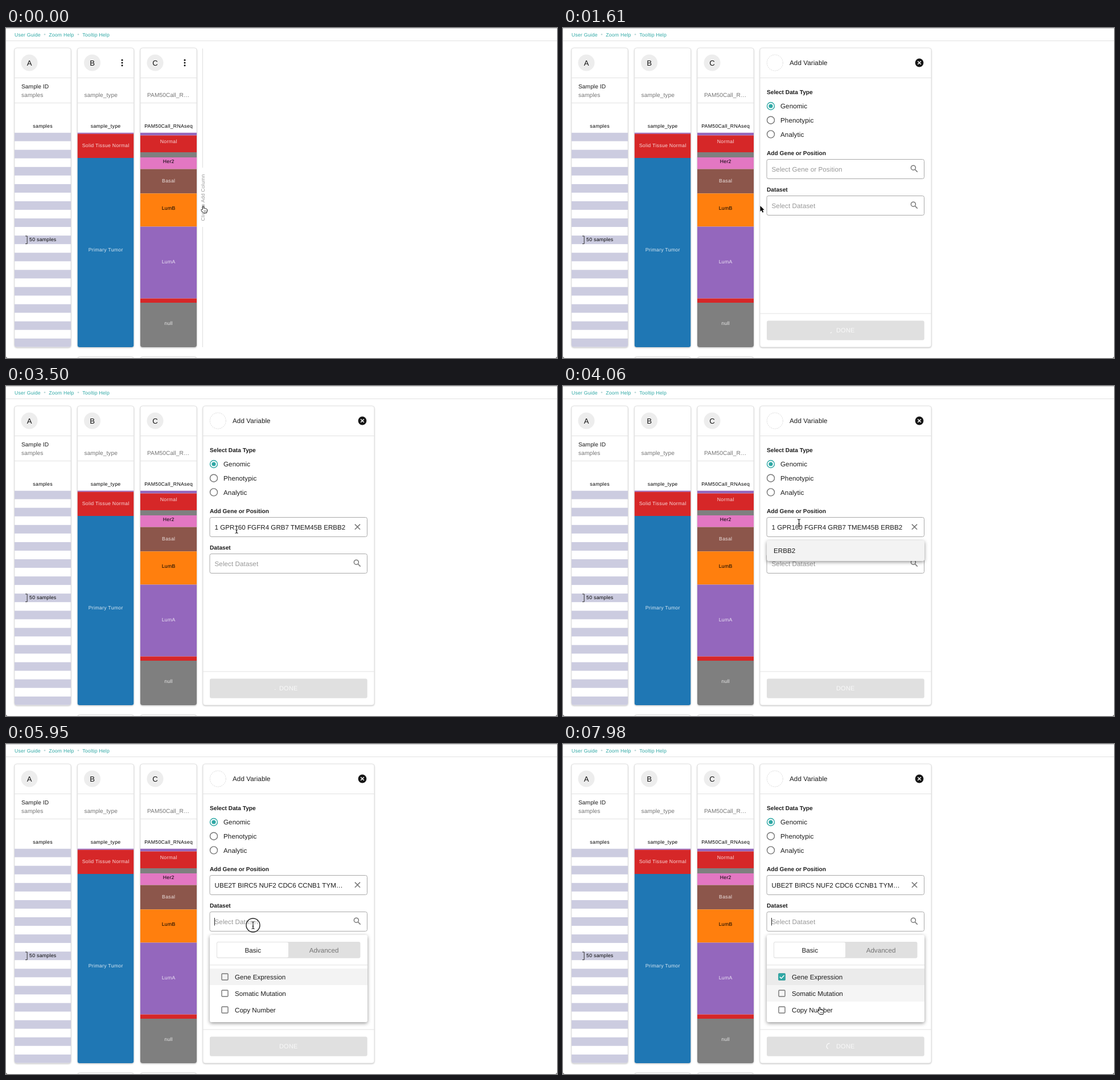
An HTML page that plays this animation: 968 by 579 pixels, repeating every 8 s.

```html
<!DOCTYPE html>
<html lang="en">
<head>
<meta charset="utf-8">
<title>Add a column</title>
<style>
  html, body { margin: 0; width: 100%; height: 100%; overflow: hidden; background: #fff; }
  svg { display: block; width: 100vw; height: 100vh; }
  text { font-family: "Liberation Sans", Arial, sans-serif; text-rendering: geometricPrecision; white-space: pre; }
  .body { font-size: 11.64px; letter-spacing: .08px; }
  .menu { font-size: 11.64px; }
  .small { font-size: 10.18px; letter-spacing: .073px; }
  .label { font-size: 10.18px; font-weight: bold; }
  .caption { font-size: 8.73px; letter-spacing: .29px; }
  .link { font-size: 8.73px; letter-spacing: .18px; }
  .avatar { font-size: 13.1px; }
  .button { font-size: 10.91px; letter-spacing: .31px; }
  .card { fill: #fff; stroke: #dcdcdc; stroke-width: .8; filter: drop-shadow(0 1px 1px rgba(0,0,0,.22)); }
  .popup { filter: drop-shadow(0 2px 3px rgba(0,0,0,.42)); }
  .rule { stroke: #e2e2e2; stroke-width: 1; }
  .field { fill: none; stroke: #a9a9a9; }
  .icon { fill: none; stroke: #767676; stroke-width: 1.5; }
</style>
</head>
<body>
<svg id="stage" viewBox="0 0 968 579" xmlns="http://www.w3.org/2000/svg"></svg>
<script>
const LOOP = 8000, STEP = 70;
const TEAL = '#2fa8a5', INK = '#1c1c1c', MUTED = '#757575', HINT = '#979797';
const RED = '#d62728', BLUE = '#1f77b4', GREY = '#7f7f7f', PURPLE = '#9467bd';
const PALE = 'rgba(255,255,255,.82)';

const text = (cls, x, y, str, fill = INK, anchor = 'start') =>
  `<text class="${cls}" x="${x}" y="${y}" fill="${fill}" text-anchor="${anchor}">${str}</text>`;
const rect = (x, y, w, h, fill, rest = '') =>
  `<rect x="${x}" y="${y}" width="${w}" height="${h}" fill="${fill}" ${rest}/>`;
const circle = (x, y, r, rest) => `<circle cx="${x}" cy="${y}" r="${r}" ${rest}/>`;
const path = (d, rest) => `<path d="${d}" ${rest}/>`;
const rule = (x, y, w) => path(`M${x} ${y}h${w}`, 'class="rule"');
const group = (id, body, rest = '') => `<g id="${id}" ${rest}>${body}</g>`;
const card = (x, w) => `<rect class="card" x="${x}" y="35" width="${w}" height="525" rx="4"/>`;

// Bands: [top, colour, label, label centre, label colour]
function bands(x, list) {
  return list.map(([top, fill, name, mid, ink = PALE], i) => {
    const end = i + 1 < list.length ? list[i + 1][0] : 560;
    return rect(x, top, 99, end - top, fill) +
      (name ? text('caption', x + 49.7, mid + 3, name, ink, 'middle') : '');
  }).join('');
}

function column(x, letter, title, subtitle, caption, content) {
  return card(x, 99) +
    circle(x + 26, 61, 14.5, 'fill="#ededed"') +
    text('avatar', x + 26, 65.7, letter, '#111', 'middle') +
    rule(x, 87.5, 99) + rule(x, 131.5, 99) +
    text('small', x + 12, 106, title) +
    text('small', x + 12, 120.6, subtitle, MUTED) +
    text('caption', x + 49.6, 175, caption, '#000', 'middle') +
    `<g clip-path="inset(0 0 0 0 round 0 0 4px 4px)">${content}</g>`;
}

const stripes = Array.from({ length: 13 }, (_, k) =>
  rect(15, 183.6 + 30.1 * k, 99, 15, '#cccce0')).join('') +
  path('M34 365h3.2v13.6H34', 'fill="none" stroke="#333"') +
  text('caption', 41, 374.3, '50 samples', '#000');

const sampleTypes = bands(125.5, [
  [183.5, PURPLE], [185.7, RED, 'Solid Tissue Normal', 206], [228, BLUE, 'Primary Tumor', 389]
]);

const subtypes = bands(236, [
  [183.5, PURPLE], [188.5, RED, 'Normal', 199], [218, GREY], [227, '#e377c2', 'Her2', 234, '#000'],
  [247.5, '#8c564b', 'Basal', 268], [290.3, '#ff7f0e', 'LumB', 316, '#000'],
  [348.5, PURPLE, 'LumA', 410], [474.5, RED], [482, GREY, 'null', 518]
]);

const links = [[15, 'User Guide'], [75.3, 'Zoom Help'], [134.3, 'Tooltip Help']]
  .map(([x, s]) => text('link', x, 14.5, s, TEAL)).join('') +
  [68, 127].map(x => circle(x, 11.3, 1.3, 'fill="#b9d6d6"')).join('');

const page = links + rule(0, 22.5, 968) +
  path('M0 .5H968', 'stroke="#c9c9c9"') +
  path('M0 575.5V579H3.5A3.5 3.5 0 0 1 0 575.5ZM968 575.5V579h-3.5A3.5 3.5 0 0 0 968 575.5Z', 'fill="#444"') +
  column(15, 'A', 'Sample ID', 'samples', 'samples', stripes) +
  column(125.5, 'B', '', 'sample_type', 'sample_type', sampleTypes) +
  column(236, 'C', '', 'PAM50Call_R…', 'PAM50Call_RNAseq', subtypes) +
  [125.5, 236].map(x => rect(x, 576.8, 99, 20, '#fff', 'rx="4" stroke="#d5d5d5"')).join('');

const dots = [204, 314].map(x => [56.2, 61, 65.8].map(y => circle(x, y, 1.5, 'fill="#111"')).join('')).join('');

const adder = path('M345.5 36V245M345.5 349V560', 'stroke="#dedede"') +
  `<g transform="translate(348.8 297.5) rotate(-90)">${text('link', 0, 0, 'Click to Add Column', HINT, 'middle')}</g>`;

const field = y => `<rect class="field" x="358" y="${y}" width="276.5" height="34" rx="3"/>`;
const search = (id, y) => group(id,
  circle(615.4, y - 1.8, 4, 'class="icon"') + path(`M618.3 ${y + 1.2}l4.4 4.4`, 'class="icon"'));
const radio = (y, name, on) =>
  circle(365, y, 6.5, `fill="none" stroke-width="1.4" stroke="${on ? TEAL : MUTED}"`) +
  (on ? circle(365, y, 3.6, `fill="${TEAL}"`) : '') + text('body', 382, y + 4.2, name);

const panel = card(346, 301) + rule(346, 87.5, 301) + rule(346, 501, 301) +
  circle(372.3, 61, 14, 'fill="none" stroke="#d0d0d0" stroke-width=".8" stroke-dasharray="2 1.4"') +
  text('body', 398, 65.2, 'Add Variable') +
  circle(626, 61, 7.4, 'fill="#161616"') +
  path('M623.2 58.2l5.6 5.6M628.8 58.2l-5.6 5.6', 'stroke="#fff" stroke-width="1.5"') +
  text('label', 358, 116.4, 'Select Data Type') +
  radio(137, 'Genomic', true) + radio(161.7, 'Phenotypic') + radio(186.4, 'Analytic') +
  text('label', 358, 223.4, 'Add Gene or Position') + field(230.5) +
  group('geneHint', text('body', 366.5, 251.5, 'Select Gene or Position', HINT) + search('geneSearch', 247)) +
  group('geneTail', text('menu', 366.5, 251.5, '1 GPR160 FGFR4 GRB7 TMEM45B ERBB2')) +
  group('geneHead', text('menu', 366.5, 251.5, 'UBE2T BIRC5 NUF2 CDC6 CCNB1 TYM…')) +
  group('geneClear', path('M612.9 242.6l9.2 9.2M622.1 242.6l-9.2 9.2', 'class="icon"')) +
  text('label', 358, 287.4, 'Dataset') + field(294.5) +
  text('body', 366.5, 315.5, 'Select Dataset', HINT) + search('dataSearch', 311) +
  rect(358, 513.5, 276.7, 34.3, '#e0e0e0', 'rx="3"') +
  text('button', 496.3, 534.2, 'DONE', '#f9f9f9', 'middle') +
  path('', 'id="spinner" fill="none" stroke="#fbfbfb" stroke-width="1.2"') +
  group('suggestion', rect(358, 271, 277, 36, '#f3f3f3', 'rx="3" class="popup"') +
    text('menu', 370, 293, 'ERBB2'));

const option = (y, name) =>
  rect(379, y - 5.5, 11, 11, 'none', `rx="1.2" stroke="${MUTED}" stroke-width="1.4"`) +
  text('menu', 402, y + 4.2, name);

const datasets = rect(358, 335, 277, 153, '#fff', 'rx="3" class="popup"') +
  rect(370, 347, 252.5, 28.7, '#e0e0e0', 'rx="3"') +
  rect(371, 348, 125, 26.6, '#fff', 'rx="2"') +
  text('menu', 433.8, 365.6, 'Basic', INK, 'middle') +
  text('menu', 558.5, 365.6, 'Advanced', MUTED, 'middle') +
  rule(358, 387.8, 277) +
  rect(358, 394, 277, 29, '#f3f3f3', 'id="firstRow"') +
  rect(358, 423, 277, 29, '#f5f5f5', 'id="secondRow"') +
  option(408.5, 'Gene Expression') + option(437.5, 'Somatic Mutation') + option(466.5, 'Copy Number') +
  group('checked', rect(378.2, 402.2, 12.6, 12.6, TEAL, 'rx="1.5"') +
    path('M380.8 408.6l2.7 2.7 5-5.2', 'fill="none" stroke="#fff" stroke-width="1.5"'));

const beam = 'M-2.6-6.3Q0-6.3 0-4.6Q0-6.3 2.6-6.3M0-4.8V4.8M-2.6 6.3Q0 6.3 0 4.6Q0 6.3 2.6 6.3M-1.4 1.8h2.8';
const cursor =
  circle(0, 0, 12, 'id="ring" fill="#fff" fill-opacity=".35" stroke="#222" stroke-width="1.4"') +
  group('arrow', path('M0 0V10L2.3 8 4 11.8 5.8 11 4.1 7.3H7.2Z',
    'fill="#000" stroke="#fff" stroke-width=".8" paint-order="stroke"')) +
  group('beam', path(beam, 'fill="none" stroke="#fff" stroke-width="2.6"') +
    path(beam, 'fill="none" stroke="#111" stroke-width="1.1"')) +
  group('hand', path('M-1.1 6.4V.9a1.1 1.1 0 0 1 2.2 0V4.4c.8-.6 1.9-.3 2.1.5 .8-.5 1.8-.2 2 .6 1-.3 1.8.2 1.8 1.2V9l-1.2 3.6H0C-.9 10.8-3.2 9-3.7 7.4c-.3-1 .9-1.6 1.7-.8z',
    'fill="#fff" stroke="#111" stroke-width="1" stroke-linejoin="round"') +
    path('M1.4 8v2.6M3 8v2.6M4.6 8v2.6', 'stroke="#333" stroke-width=".6"'));

document.getElementById('stage').innerHTML = page + group('dots', dots) + group('adder', adder) +
  group('panel', panel) + group('datasets', datasets) +
  rect(366, 241, 1, 13.5, '#222', 'id="caret"') + group('cursor', cursor);

const ui = {};
document.querySelectorAll('[id]').forEach(el => ui[el.id] = el);
const show = (name, on) => ui[name].style.display = on ? '' : 'none';
const within = (t, spans) => spans.find(([from, to]) => t >= from && t < to);

// Pointer moves: [start, end, x, y] reached at the end
const moves = [
  [0, 1, 346.5, 312], [2030, 2660, 405, 252], [3920, 4340, 442, 206], [4760, 5110, 434, 328.3],
  [5250, 5460, 434, 318], [6930, 7210, 440, 402], [7560, 7980, 451, 462]
];
// Clicks: [from, to, ring radius]
const clicks = [[1400, 1540, 22], [2730, 2870, 12.3], [4550, 4690, 22], [5740, 6020, 12], [7490, 7630, 22]];
const geneCaret = [[2730, 3290]], dataCaret = [[5740, 6440], [7000, LOOP]];
// Loading: [from, to, spin start]
const loading = [[1540, 1820, 1470], [3500, 3710, 3430], [7630, LOOP, 7610]];

const ease = u => u * u * (3 - 2 * u);

function pointer(t) {
  let [, , x, y] = moves[0];
  for (const [from, to, nx, ny] of moves) {
    const u = ease(Math.min(1, Math.max(0, (t - from) / (to - from))));
    x += (nx - x) * u;
    y += (ny - y) * u;
  }
  return [x, y];
}

function pointerKind(t, x, y) {
  if (t < 1540 || (t >= 5740 && y > 394)) return 'hand';
  const inField = x > 358 && [230.5, 294.5].some(top => y >= top && y <= top + 34);
  return inField ? 'beam' : 'arrow';
}

function spinnerPath(ms) {
  const grow = ease(Math.min(1, ms / 700));
  const start = (ms / 1400 + .12 * grow) * 2 * Math.PI;
  const sweep = (.01 + .78 * grow) * 2 * Math.PI;
  const at = a => `${468.2 + 5 * Math.cos(a)} ${530.3 + 5 * Math.sin(a)}`;
  return `M${at(start)}A5 5 0 ${sweep > Math.PI ? 1 : 0} 1 ${at(start + sweep)}`;
}

function render(time) {
  const t = Math.floor(time / STEP) * STEP;
  const open = t >= 1540, filled = t >= 3500, left = t >= 4620;
  show('dots', !open);
  show('adder', !open);
  show('panel', open);
  show('geneHint', !filled);
  show('geneTail', filled && !left);
  show('geneHead', left);
  show('geneClear', filled);
  show('suggestion', t >= 3570 && !left);
  show('datasets', t >= 5740);
  show('checked', t >= 7490);
  show('secondRow', t >= 7770);
  ui.firstRow.setAttribute('fill', t >= 7490 ? '#ebebeb' : '#f3f3f3');

  const inData = within(t, dataCaret);
  show('caret', inData || within(t, geneCaret));
  ui.caret.setAttribute('y', inData ? 305 : 241);

  const busy = within(t, loading);
  ui.spinner.setAttribute('d', busy ? spinnerPath(t - busy[2]) : '');

  const [x, y] = pointer(t), kind = pointerKind(t, x, y);
  ui.cursor.setAttribute('transform', `translate(${x} ${y})`);
  for (const name of ['arrow', 'beam', 'hand']) show(name, name === kind);
  const click = within(t, clicks);
  show('ring', click);
  if (click) ui.ring.setAttribute('r', click[2]);
}

const begin = performance.now();
function tick() {
  render((performance.now() - begin) % LOOP);
  requestAnimationFrame(tick);
}
tick();
</script>
</body>
</html>
```
